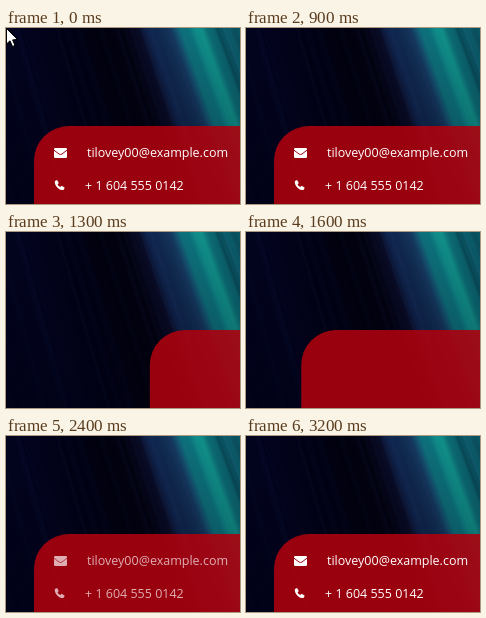
An HTML page with a canvas for the animation above (3.4 s loop, 234x176 px).

```html
<!DOCTYPE html>
<html lang="en">
<head>
<meta charset="utf-8">
<title>Contact panel</title>
<style>
html, body { margin: 0; width: 100%; height: 100%; overflow: hidden; background: #fff; }
canvas { display: block; }
</style>
</head>
<body>
<canvas id="stage" width="234" height="176"></canvas>
<script>
const W = 234, H = 176, LOOP = 3400;
const PANEL = { x: 28, y: 98, width: 239, radius: 35 };
const ctx = document.getElementById('stage').getContext('2d');
const FONT = '12.5px "Open Sans", "Noto Sans", sans-serif';

const span = (t, a, b) => Math.min(1, Math.max(0, (t - a) / (b - a)));

// CSS "ease": cubic-bezier(.25, .1, .25, 1)
function ease(x) {
  const bez = (u, a, b) => 3 * u * (1 - u) * (1 - u) * a + 3 * u * u * (1 - u) * b + u * u * u;
  let lo = 0, hi = 1;
  for (let i = 0; i < 24; i++) {
    const mid = (lo + hi) / 2;
    if (bez(mid, 0.25, 0.25) < x) lo = mid; else hi = mid;
  }
  return bez(lo, 0.1, 1);
}

function random(seed) {
  return () => (seed = (seed * 16807) % 2147483647) / 2147483647;
}

function makeCanvas(width, height) {
  const c = document.createElement('canvas');
  c.width = width;
  c.height = height;
  return c;
}

// One row of light, running from x = LEFT to x = LEFT + width
const LEFT = -60;
function makeRow() {
  const width = 300;
  const c = makeCanvas(width, 1);
  const g = c.getContext('2d');
  const light = g.createLinearGradient(0, 0, width, 0);
  const stops = [
    [-60, '#01011a'], [-10, '#02031d'], [20, '#03031e'], [50, '#020218'],
    [90, '#01010f'], [115, '#03020f'], [126, '#070820'], [133, '#0a0e2a'],
    [139, '#10224a'], [150, '#10284f'], [163, '#143459'], [168, '#154a6c'],
    [174, '#0e6f7a'], [182, '#0c717c'], [188, '#0f8a88'], [195, '#119089'],
    [201, '#0c6c74'], [212, '#0a5a68'], [224, '#0b5c68'], [240, '#0a4c5c']
  ];
  for (const [x, color] of stops) light.addColorStop((x - LEFT) / width, color);
  g.fillStyle = light;
  g.fillRect(0, 0, width, 1);
  const rnd = random(71);
  for (let i = 0; i < 40; i++) {
    const x = rnd() * width;
    const alpha = x > 190 ? 0.06 : 0.025;
    g.fillStyle = rnd() < 0.5 ? `rgba(0,0,14,${alpha * 1.6})` : `rgba(50,90,150,${alpha})`;
    g.fillRect(x, 0, 2 + rnd() * 5, 1);
  }
  return c;
}

// Streaks lean right and fan out slightly towards the bottom
function makeBackdrop() {
  const c = makeCanvas(W, H);
  const g = c.getContext('2d');
  const row = makeRow();
  for (let y = 0; y < H; y++) {
    const scale = 1 + 0.0005 * y;
    g.drawImage(row, LEFT * scale + 0.27 * y, y, row.width * scale, 1);
  }
  const shade = g.createLinearGradient(0, 0, 0, H);
  shade.addColorStop(0, 'rgba(0,0,12,0)');
  shade.addColorStop(1, 'rgba(0,0,12,.3)');
  g.fillStyle = shade;
  g.fillRect(0, 0, W, H);
  return c;
}
const backdrop = makeBackdrop();

function drawPanel(x) {
  const { y, width, radius } = PANEL;
  ctx.fillStyle = 'rgba(174,2,14,.89)';
  ctx.beginPath();
  ctx.roundRect(x, y, width, H - y, [radius, 0, 0, 0]);
  ctx.fill();
}

function drawEnvelope(x, y) {
  ctx.fillStyle = '#fff';
  ctx.beginPath();
  ctx.roundRect(x, y, 13, 10, 1.3);
  ctx.fill();
  ctx.strokeStyle = '#a00312';
  ctx.lineWidth = 1;
  ctx.beginPath();
  ctx.moveTo(x, y + 2.2);
  ctx.lineTo(x + 5, y + 6);
  ctx.quadraticCurveTo(x + 6.5, y + 7, x + 8, y + 6);
  ctx.lineTo(x + 13, y + 2.2);
  ctx.stroke();
}

function drawPhone(x, y) {
  ctx.fillStyle = '#fff';
  ctx.beginPath();
  ctx.moveTo(x + 0.4, y + 1);
  ctx.lineTo(x + 2.6, y);
  ctx.lineTo(x + 4.3, y + 3);
  ctx.lineTo(x + 3, y + 4.4);
  ctx.quadraticCurveTo(x + 4, y + 6.3, x + 5.8, y + 7.1);
  ctx.lineTo(x + 7.1, y + 5.8);
  ctx.lineTo(x + 10, y + 7.4);
  ctx.quadraticCurveTo(x + 10, y + 10, x + 7.4, y + 10);
  ctx.bezierCurveTo(x + 3.6, y + 9.6, x - 0.4, y + 5, x + 0.4, y + 1);
  ctx.fill();
}

function drawContacts(alpha) {
  ctx.globalAlpha = alpha;
  drawEnvelope(48, 120);
  drawPhone(48.5, 152);
  ctx.fillStyle = '#fff';
  ctx.font = FONT;
  ctx.fillText('tilovey00@example.com', 81, 129);
  ctx.fillText('+ 1 604 555 0142', 79, 162);
  ctx.globalAlpha = 1;
}

function drawCursor() {
  ctx.fillStyle = '#fff';
  ctx.strokeStyle = '#000';
  ctx.lineWidth = 1;
  ctx.beginPath();
  ctx.moveTo(0.5, 0.5);
  ctx.lineTo(0.5, 16);
  ctx.lineTo(4, 12.8);
  ctx.lineTo(6.5, 18.5);
  ctx.lineTo(9, 17.4);
  ctx.lineTo(6.6, 11.9);
  ctx.lineTo(11.4, 11.4);
  ctx.closePath();
  ctx.fill();
  ctx.stroke();
}

function draw(t) {
  ctx.fillStyle = '#fefefe';
  ctx.fillRect(0, 0, W, H);
  if (t >= 1000 && t < 1100) return;
  ctx.drawImage(backdrop, 0, 0);
  const reloaded = t >= 1100;
  const slide = reloaded ? ease(span(t, 1000, 2000)) : 1;
  const fade = reloaded ? ease(span(t, 2000, 3000)) : 1;
  drawPanel(PANEL.x + PANEL.width * (1 - slide));
  if (fade > 0) drawContacts(fade);
  if (t < 100) drawCursor();
}

const start = performance.now();
function tick() {
  draw((performance.now() - start) % LOOP);
  requestAnimationFrame(tick);
}
tick();
</script>
</body>
</html>
```
